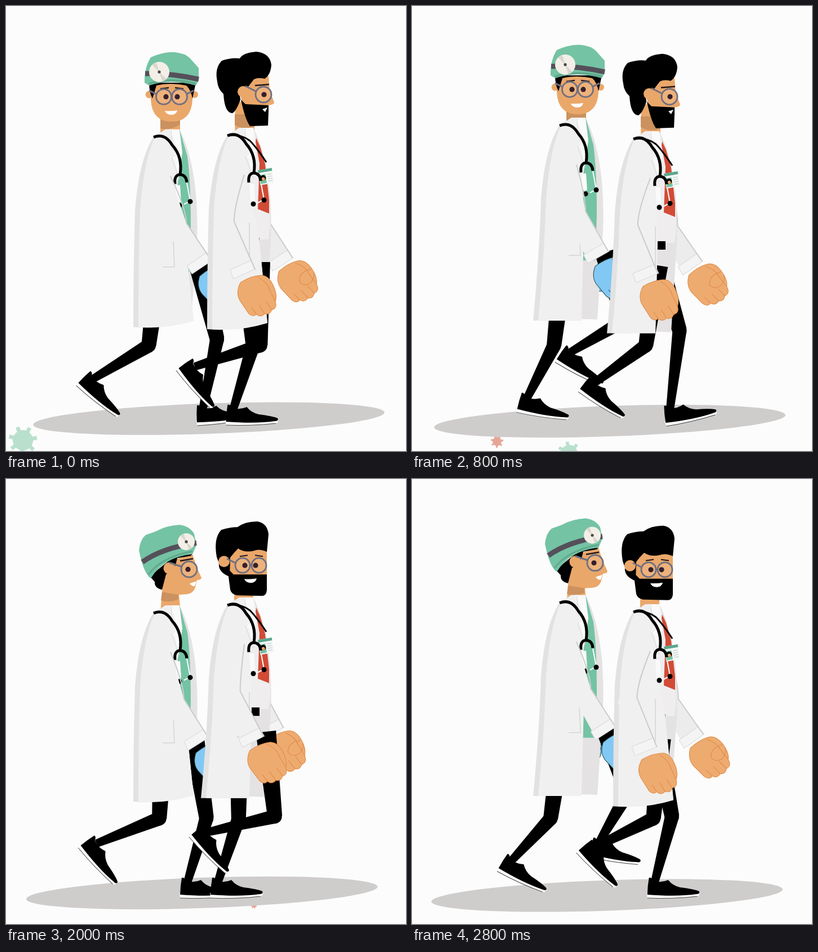
Animation, 710 px wide and 789 px high, one loop 2880 ms. Source, as an HTML page with a canvas:

```html
<!DOCTYPE html>
<html lang="en">
<head>
<meta charset="utf-8">
<title>Walking doctors</title>
<style>
html, body { margin: 0; width: 100%; height: 100%; overflow: hidden; background: #fcfcfc; }
canvas { display: block; }
</style>
</head>
<body>
<canvas id="stage" width="710" height="789"></canvas>
<script>
const ctx = document.getElementById('stage').getContext('2d');
const STEP = 80, STEPS = 36, CYCLE = 12, TAU = Math.PI * 2;
const SKIN = '#eaa76a', SHADE = '#cb915e', DARK = '#000', COAT = '#f0f0f0', LINE = '#cbcbcb', GREEN = '#b9e0cd', CORAL = '#e5a698';

// strike: step at which the near heel lands; armPeak: step at which the near arm is foremost.
const left = {
  x: 262, y: 235, skin: '#82c8f4', outline: '#1d4a4a', shirt: '#74c3a4', shirtEdge: 66, shirtEnd: 240,
  strike: 11.5, armPeak: 11.9, reach: 67, hemY: 571, hemBob: .55,
  bob: s => -11 + 13 * Math.cos(TAU * (s - .9) / 6),
  opens: s => s > 3
};
const right = {
  x: 393, y: 229, skin: '#edab70', outline: '#e08945', shirt: '#efedee', shirtEdge: 76, shirtEnd: 185, tie: true,
  strike: 4, armPeak: 4.7, reach: 77, hemY: 573, hemBob: 1.2,
  bob: s => 6 - 6 * Math.max(0, (s + 2) % 6 - 1),
  opens: s => s % 3 === 1
};
// Peak time and place.
const greens = [[0, 30, 770], [640, 327, 793], [1680, 680, 749]];
const corals = [[800, 151, 772], [1280, 607, 790], [1680, 397, 767], [2240, 368, 756]];

function fill(path, color) { ctx.fillStyle = color; ctx.fill(new Path2D(path)); }
function stroke(path, color, width) { ctx.strokeStyle = color; ctx.lineWidth = width; ctx.stroke(new Path2D(path)); }
function poly(points, color) { fill('M' + points.map(q => q.join()).join('L') + 'Z', color); }
function disc(x, y, r, color) { ctx.fillStyle = color; ctx.beginPath(); ctx.arc(x, y, r, 0, 7); ctx.fill(); }
function at(x, y, angle, draw) { ctx.save(); ctx.translate(x, y); ctx.rotate(angle); draw(); ctx.restore(); }

function taper(x0, y0, w0, x1, y1, w1) {
  const d = Math.hypot(x1 - x0, y1 - y0), nx = (y0 - y1) / d / 2, ny = (x1 - x0) / d / 2;
  poly([[x0 + nx * w0, y0 + ny * w0], [x1 + nx * w1, y1 + ny * w1], [x1 - nx * w1, y1 - ny * w1], [x0 - nx * w0, y0 - ny * w0]], DARK);
}

// Knee, ankle and foot angle, u steps after the heel lands: the foot slides back, lifts and swings forward.
function gait(u) {
  const v = Math.max(0, (u - 3.8) / 8.2), rise = (u + 7) % CYCLE - 6;
  return {
    kx: 34 + 50 * Math.cos(TAU * (u - 11.45) / CYCLE),
    ky: 602 - 52 * Math.exp(-rise * rise / 1.5),
    ax: u < 6 ? 65 - 27.3 * u : -107 + 170 * ((u - 6.5) / 5.5) ** 2,
    ay: 711 - 125 * v ** .75 * (1 - v ** 14),
    angle: (50 * Math.sin(Math.PI * v ** 1.1) - 11 * Math.max(0, 1 - u)) * Math.PI / 180
  };
}

function leg(X, Y, u) {
  const { kx, ky, ax, ay, angle } = gait((u + 2 * CYCLE) % CYCLE);
  taper(X + 13 + kx * .4, Y + 225, 36, X + kx, ky, 26);
  disc(X + kx, ky, 12.5, DARK);
  taper(X + kx, ky, 25, X + ax, ay + 4, 14);
  at(X + ax, ay, angle, () => {
    fill('M-14 23L79 22Q81 27 76 29Q30 34-13 32Z', '#fff');
    stroke('M-13 32Q30 34 76 29', '#444', 1);
    fill('M-13 26L-12 10L-10-4Q-6-5-3 1Q10 6 24 0Q32 10 45 13Q70 16 79 20Q81 25 74 25Q40 30-13 26Z', DARK);
  });
}

function hand(d, far) {
  const shape = 'M-14 6Q-29 18-28 34L-23 62Q-19 72-11 69Q-7 78 3 74Q10 80 17 73Q28 74 29 62Q38 52 37 32Q36 14 24 9Q8 3-14 6Z';
  ctx.translate(1, far ? 0 : 5);
  fill(shape, d.skin);
  stroke(shape, d.outline, 1);
  stroke('M-11 69L-14 54M3 74L0 56M17 73L14 55M18 10Q30 24 28 40L29 62', d.outline, 1);
  if (far) stroke('M36 34Q14 26 6 42Q8 54 22 54Q34 50 36 42', d.outline, 1);
}

function arm(d, sx, sy, ex, ey, wx, wy, far) {
  const angle = Math.atan2(wy - ey, wx - ex) - Math.PI / 2;
  const ux = Math.cos(angle), uy = Math.sin(angle), bx = wx - ux * 40, by = wy - uy * 40;
  at((wx + bx) / 2, (wy + by) / 2, angle, () => hand(d, far));
  poly([[sx, sy], [ex, ey], [wx, wy], [bx, by], [ex - 34, ey + 8], [sx - 30, sy + 8]], far ? '#ececec' : COAT);
  at(wx, wy, angle, () => {
    fill('M2 0L-42 0L-41-17L1-17Z', '#f4f4f4');
    stroke('M1-17L-41-17M2 0L-42 0L-41-17', '#d9d9d9', 1);
  });
  stroke(`M${sx} ${sy}Q${ex} ${ey - 25} ${ex} ${ey}L${wx} ${wy}`, LINE, 2);
}

function nearPanel(X, Y, hem, open, o, color) {
  const bx = X - (open ? 47 : 36) + o, fx = X + (open ? 39 : 71), fy = hem - (open ? 0 : 11), mid = X + (open ? 43 : 56);
  fill(`M${X + 21} ${Y - 13}L${X + o * .3} ${Y}Q${X - 26 + o} ${Y + 40} ${X - 33 + o} ${Y + 130}Q${X - 36 + o} ${Y + 230} ${bx} ${hem}` +
    `Q${(bx + fx) / 2} ${hem + (hem - fy) * .4} ${fx} ${fy}L${mid} ${Y + 180}L${X + 41} ${Y + 95}L${X + 50} ${Y + 30}L${X + 34} ${Y - 13}Z`, color);
}

function badge() {
  fill('M-12-13H13V14H-12Z', '#f4f7f6');
  fill('M-12-13H13V-8H-12Z', '#5aa78e');
  fill('M-11-4H0V12H-11Z', '#74c3a4');
  disc(-5, 2, 5, DARK);
  disc(-5, 4, 3, SKIN);
  stroke('M3-3H11M3 1H11M3 5H11M3 9H11', '#b9c9c5', 1);
}

function doctor(d, p, head) {
  const s = p % 6, bob = d.bob(s), X = d.x, Y = d.y + bob, open = d.opens(s), hem = d.hemY + bob * d.hemBob;
  const swing = Math.cos(TAU * (p - d.armPeak) / CYCLE);
  at(0, bob * .63, 0, head);
  arm(d, X + 66, Y + 85, X + 58 - 22 * swing, Y + 155, X + 85 - 40 * swing, Y + 218, true);
  leg(X, Y, p - d.strike - 6);
  fill(`M${X + 46} ${Y - 13}Q${X + 68} ${Y + 30} ${X + 75} ${Y + 100}Q${X + 80} ${Y + 165} ${X + 75} ${Y + 215}L${X + 67} ${hem - (open ? 2 : 18)}L${X} ${hem - 4}L${X + 30} ${Y}Z`, '#e4e2e2');
  leg(X + 36, Y, p - d.strike);
  at(X, Y, 0, () => {
    const e = d.shirtEdge;
    fill(`M40-10L46-13L60 35Q${e} 80 ${e} 160L${e - 3} ${d.shirtEnd}L38 ${d.shirtEnd}V60Z`, d.shirt);
    if (d.tie) {
      fill('M51 5L58 20L67 52L74 115V139L54 131L57 50L50 12Z', '#d14b35');
      fill('M40 182H57V197H40Z', DARK);
    }
  });
  nearPanel(X, Y, hem, open, 0, '#e2e2e2');
  nearPanel(X, Y, hem, open, 9, COAT);
  at(X, Y, 0, () => {
    fill('M28-13L46-13L51 28L44 75L38 42L32 36L43 24Z', '#fafafa');
    stroke('M31-12L33 22L44 27L32 38L46 76', '#d8d8d8', 1);
    stroke(d.tie ? 'M39 155V234H17' : 'M35 186L37 231H16', '#d0d0d0', 1.3);
    stroke('M43 88L45 120M59 82L65 114L54 120', '#fff', 2);
    stroke('M43 86L45 116', '#fafafa', 8);
    if (d.tie) {
      stroke('M1 0Q25-2 40 10Q52 22 69 48', DARK, 3);
      at(68, 73, -.17, badge);
    }
    stroke('M0 1Q20-7 33 15Q52 36 47 67M38 84Q36 68 47 67Q58 68 59 81', DARK, 5);
    disc(46, 122, 4.5, DARK);
    disc(65, 115, 4.5, DARK);
  });
  arm(d, X + 30, Y + 70, X + 32 + 26 * swing, Y + 153, X + d.reach + 36 * swing, Y + 230 - 10 * swing);
}

function glasses(temples, ...eyes) {
  for (const [x, y, ex, r] of eyes) {
    disc(x, y, r, '#edb27b');
    stroke(`M${x - r} ${y}a${r} ${r} 0 1 0 ${2 * r} 0a${r} ${r} 0 1 0 ${-2 * r} 0`, '#6f6f82', 2.8);
    disc(ex, y, 4.6, '#35202b');
  }
  stroke(temples, '#6f6f82', 3);
}

function mirror(x, y, r) {
  disc(x, y, r, '#f3efe7');
  fill(`M${x} ${y}L${x - r * .7} ${y - r * .7}L${x - r * .3} ${y - r * .95}ZM${x} ${y}L${x + r * .7} ${y + r * .7}L${x + r * .3} ${y + r * .95}Z`, '#dad6cf');
  disc(x, y, 2.6, '#4b444d');
}

function capFront() {
  fill('M274 190H309V240H274Z', SKIN);
  fill('M274 203H309V212Q290 224 274 219Z', SHADE);
  disc(254, 159, 6.5, SKIN);
  disc(335, 159, 6, SKIN);
  fill('M257 140H331V168Q329 207 294 207Q259 207 257 168Z', SKIN);
  fill('M254 138H337L331 166Q328 150 320 143Q290 137 267 143L260 166Q254 155 254 138Z', DARK);
  fill('M246 138Q245 112 257 93Q280 83 300 84Q318 86 326 94L342 112V134L337 143Q292 130 254 143Z', '#74c3a4');
  stroke('M247 122Q292 121 342 132', '#55505a', 9);
  stroke('M254 140Q292 128 337 140', '#62a98d', 4);
  mirror(272, 119, 18);
  stroke('M274 149L289 147M300 147L315 149', '#20181c', 2.2);
  glasses('M254 152L266 158M333 152L321 158M292 161H296', [280, 163, 284, 13.5], [308, 163, 304, 13.5]);
  fill('M282 188Q293 189 304 187Q302 195 293 195Q284 194 282 188Z', '#fff');
}

function capSide() {
  ctx.translate(0, 11);
  fill('M278 175L285 135L331 121L338 143L347 163Q346 167 339 167L337 175Q335 190 321 192L307 193L310 225H274Z', SKIN);
  fill('M277 188L306 193V201Q290 208 275 203Z', SHADE);
  fill('M255 160L300 124L331 120L328 124L304 128L301 140Q295 152 284 157L277 184Q263 181 264 170Z', DARK);
  disc(290, 146, 10.5, SKIN);
  fill('M236 114Q238 95 248 87L265 81Q285 70 308 69Q326 71 334 85L338 105L331 121Q280 126 257 164Q244 155 236 114Z', '#74c3a4');
  stroke('M253 157Q276 126 331 116', '#62a98d', 3);
  stroke('M242 135Q277 110 338 101', '#55505a', 9);
  mirror(320, 99, 15);
  stroke('M309 133L332 129', '#20181c', 2.4);
  glasses('M290 136L311 143', [325, 148, 323, 14]);
  fill('M326 173L338 169L335 178Q329 178 326 173Z', '#fff');
}

function beardSide() {
  fill('M407 170H441V240H406Z', SKIN);
  fill('M406 192H432L441 210V214Q420 220 406 211Z', SHADE);
  fill('M415 140L435 127L466 124L468 150L476 171Q476 175 466 176L464 190H420Z', SKIN);
  fill('M375 134Q370 110 383 97Q400 91 415 93Q420 83 444 81Q468 83 471 104Q470 122 459 129Q448 126 440 130L430 143L414 150L416 166Q409 186 402 190Q388 190 386 156Q376 147 375 134Z', DARK);
  fill('M417 166L425 174L466 176V188L465 212L433 213Q424 200 417 166Z', DARK);
  disc(421, 152, 10, SKIN);
  stroke('M442 141L467 139', '#20181c', 2.4);
  glasses('M425 142L443 151', [457, 157, 458, 14]);
  fill('M455 183L464 180L460 188Z', '#fff');
}

function beardFront(smile) {
  ctx.translate(0, -3);
  fill('M405 195H439V240H405Z', SKIN);
  fill('M392 130H463V182H398Z', SKIN);
  fill('M374 145Q368 112 382 97Q398 92 411 92Q424 82 446 82Q464 85 466 105L463 136Q450 130 440 134Q424 138 412 130Q404 138 398 146L397 180Q376 172 378 156Z', DARK);
  fill('M393 165L404 176H463V204Q462 214 454 214L410 213Q400 211 398 203Z', DARK);
  disc(387, 153, 10, SKIN);
  stroke('M415 144L429 142M442 142L456 144', '#20181c', 2.2);
  glasses('M392 148L408 156M432 159H436', [420, 160, 424, 13], [449, 160, 443, 13]);
  if (smile) fill('M423 184Q434 185 445 183Q443 191 434 191Q425 190 423 184Z', '#fff');
  else fill('M428 188Q435 185 442 188Q435 194 428 188Z', '#a9626a');
}

// Germs swell, drift left and shrink again.
function germs(places, time, size, color) {
  for (const [peak, x, y] of places) {
    const age = (time - peak) / 280;
    if (Math.abs(age) >= 1) continue;
    const r = size * Math.sqrt(1 - age * age);
    at(x - 84 * age, y, .5 + age * .4, () => {
      disc(0, 0, r, color);
      for (let i = 0; i < 7; i++) {
        ctx.rotate(TAU / 7);
        stroke(`M0 0V${-r * 1.4}`, color, r * .38);
      }
    });
  }
}

function render() {
  const step = Math.floor(performance.now() / STEP) % STEPS, time = step * STEP, p = step % CYCLE;
  ctx.fillStyle = '#fcfcfc';
  ctx.fillRect(0, 0, 710, 789);
  germs(greens, time, 18, GREEN);
  germs(corals, time, 8, CORAL);
  ctx.fillStyle = '#cfcccc';
  ctx.beginPath();
  ctx.ellipse(360 - 14 * (step / STEPS) ** .35, 731.5 + 2.3 * (step % 4), 312, 27, -.035, 0, 7);
  ctx.fill();
  const turned = step >= STEPS / 2;
  doctor(left, p, turned ? capSide : capFront);
  doctor(right, p, turned ? () => beardFront(step >= STEPS * 2 / 3) : beardSide);
  requestAnimationFrame(render);
}

ctx.lineJoin = 'round';
render();
</script>
</body>
</html>
```
